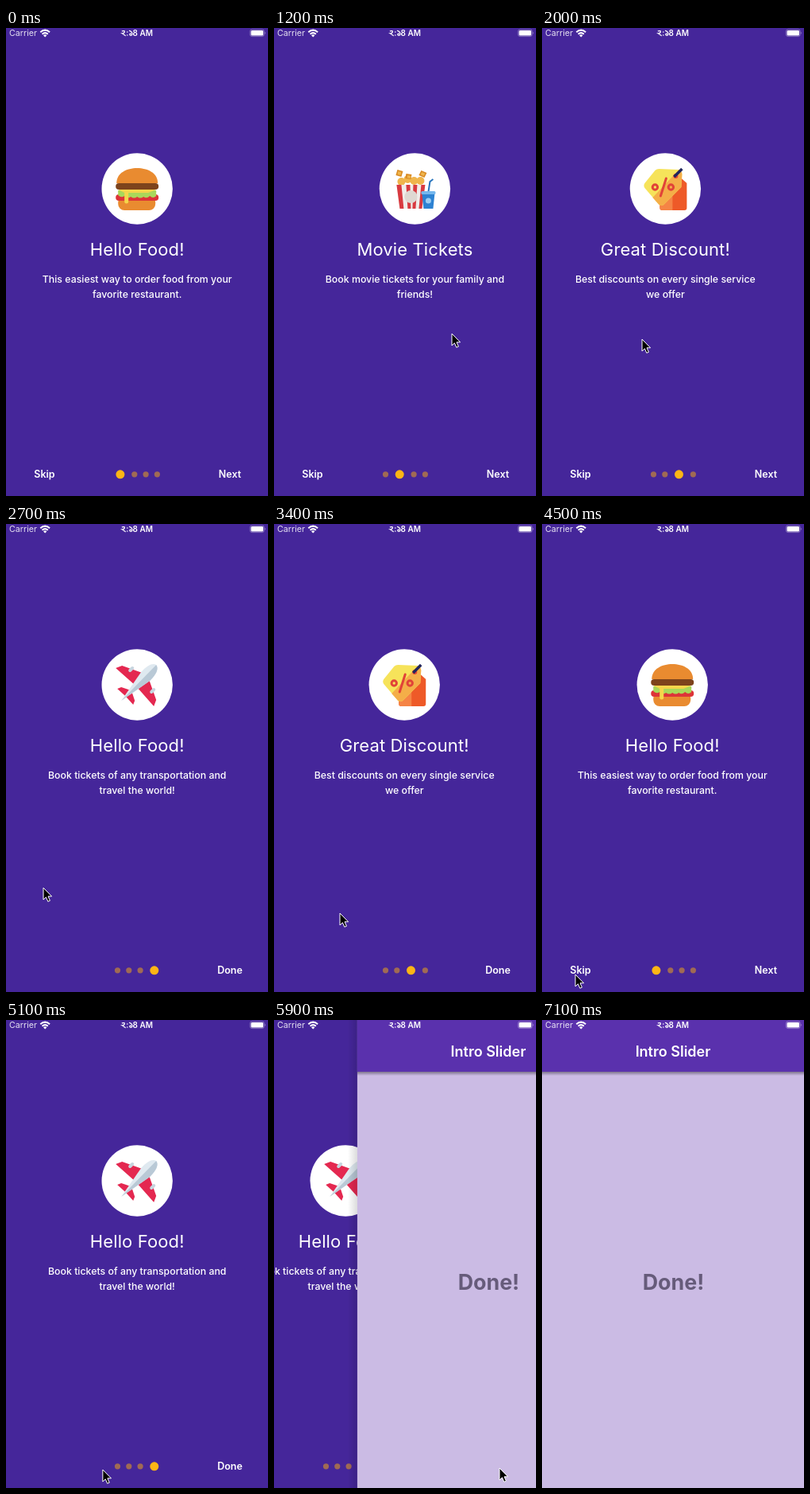
An HTML page that plays this animation: 330x588 px, repeating every 9500 ms.

```html
<!DOCTYPE html>
<html lang="en">
<head>
<meta charset="utf-8">
<title>Intro slider</title>
<style>
  html, body { margin: 0; width: 100%; height: 100%; overflow: hidden; background: #45269a; }
  svg { display: block; width: 330px; height: 588px; font-family: Inter, Roboto, sans-serif; fill: #fff; }
  text { white-space: pre; }
  .mid { text-anchor: middle; }
  .title { font-size: 22px; letter-spacing: .12px; }
  .body { font-size: 12.35px; font-weight: 500; }
  .button { font-size: 12.5px; font-weight: 600; }
</style>
</head>
<body>
<svg viewBox="0 0 330 588">
  <defs>
    <linearGradient id="edge"><stop stop-opacity="0"/><stop offset="1" stop-opacity=".14"/></linearGradient>
    <linearGradient id="under" x2="0" y2="1"><stop stop-opacity=".38"/><stop offset="1" stop-opacity="0"/></linearGradient>

    <g id="burger">
      <path fill="#e98b30" d="M-26-7C-26-20-13-26 0-26S26-20 26-7Z"/>
      <rect x="-24" y="9" width="47" height="18" rx="8" fill="#e98b30"/>
      <rect x="-27" y="7" width="54" height="8" rx="4" fill="#dd3438"/>
      <path fill="#a9d85a" d="M-24 2H24V9Q20 13 16 9Q12 13 8 10Q4 13 0 10Q-4 13-8 10Q-12 13-16 9Q-20 12-24 8Z"/>
      <path fill="#f5d64b" d="M-24 1H24L14 5H-11V16a2.5 2.5 0 0 1-5 0V5Z"/>
      <rect x="-27" y="-7" width="54" height="8" rx="4" fill="#7d431c"/>
    </g>

    <g id="popcorn">
      <g fill="#efb54c">
        <circle cx="-17" cy="-9" r="5"/><circle cx="-9" cy="-12" r="5"/><circle cx="-1" cy="-10" r="5"/><circle cx="7" cy="-10" r="5"/>
        <path fill="#d98b24" d="M-22-24l7 2-2 7-7-2ZM-11-19l7 1-1 6-7-1ZM8-23l7 3-3 6-7-3Z"/>
        <path d="M-21-22l4 1-1 4-4-1ZM-9-17l4 1-1 3-4-1ZM9-21l4 2-2 3-4-2Z"/>
      </g>
      <path fill="#f0ece9" d="M-23-5H13L9 25H-19Z"/>
      <path fill="#d83a40" d="M-23-5h6l3 30h-5ZM-11-5h5l1 30h-4ZM-2-5h5l-2 30h-4ZM8-5h5L9 25H5Z"/>
      <circle cx="-5" cy="10" r="8" fill="#ded8d2"/>
      <path fill="none" stroke="#2674bd" stroke-width="2" d="M17 4L19-9L23-12"/>
      <path fill="#2d82d2" d="M9 6H25L23 25H11Z"/>
      <rect x="8" y="3" width="18" height="4" rx="1.5" fill="#75b7ed"/>
      <circle cx="17" cy="15" r="3.5" fill="#9bcdf3"/>
    </g>

    <g id="tags">
      <path fill="#ee5a28" d="M-7 2L9-16H17L27-7V24Q27 27 24 27H-4Q-7 27-7 24Z"/>
      <path fill="#f58445" d="M-7 2H9V27H-4Q-7 27-7 24Z"/>
      <path fill="#f6e35a" d="M-26-7Q-28-4-26-1L-8 20Q-5 22-2 20L20-2L21-18Q21-22 17-24L-8-25Q-11-25-13-23Z"/>
      <path fill="#f4ae48" d="M17-24Q21-22 21-18L20-2L-2 20Q-5 22-8 20L-16 11Z"/>
      <g fill="none" stroke="#e14338" stroke-width="3">
        <circle cx="-13" cy="-2" r="3.2"/><circle cx="7" cy="-2" r="3.2"/>
        <path stroke-linecap="round" d="M-6 9L1-13"/>
      </g>
      <circle cx="13" cy="-16" r="3" fill="#e14338"/>
      <path stroke="#20265e" stroke-width="3.5" d="M11-15L21-25"/>
    </g>

    <g id="plane">
      <path id="wing" fill="#e42850" d="M-27-21L-19-24L12-13L-1 2ZM-25 5L-20 3L-8 7L-15 14Z"/>
      <use href="#wing" transform="matrix(0 -1 -1 0 0 0)"/>
      <path stroke="#c7d5df" stroke-width="4" stroke-linecap="round" d="M-9-18L-6-21M18 9L21 6"/>
      <path fill="#dfe9f0" d="M-20 20L5-16Q17-29 24-25Q29-18 16-5Z"/>
      <path fill="#b9c9d6" d="M-20 20L24-25Q29-18 16-5Z"/>
    </g>
  </defs>

  <g id="intro">
    <rect width="330" height="588" fill="#45269a"/>
    <g id="pages"></g>
    <text id="skip" class="button mid" x="48.5" y="565">Skip</text>
    <text id="next" class="button mid" x="282" y="565"></text>
    <g id="dots"></g>
  </g>

  <g id="done">
    <rect x="-12" width="12" height="588" fill="url(#edge)"/>
    <rect width="330" height="588" fill="#cbbbe4"/>
    <rect y="65" width="330" height="5" fill="url(#under)"/>
    <rect width="330" height="65" fill="#5a31ad"/>
    <text class="mid" x="165" y="46" font-size="18" font-weight="600">Intro Slider</text>
    <text class="mid" x="165.5" y="338.5" font-size="26.8" font-weight="700" fill="#665b7a">Done!</text>
  </g>

  <g id="status">
    <text x="4" y="10" font-size="10.7" opacity=".85">Carrier</text>
    <path fill="none" stroke="#fff" stroke-width="2" d="M43.3 5.3Q49.2 0 55.1 5.3M45.6 7.7Q49.2 4.6 52.8 7.7"/>
    <path d="M47 9.2Q49.2 7.4 51.4 9.2L49.2 11.4Z"/>
    <path fill="none" stroke="#fff" stroke-width="1.2" stroke-linecap="round"
      d="M146.3 3.9Q149.8 2.8 149.4 5Q148.6 7 146.2 6.8L150.3 9.6M155.5 3.4Q159.5 5 159 8Q157.5 10.6 155.8 8.6Q155.6 6.6 157.4 7.4"/>
    <circle cx="152.8" cy="5" r=".8"/><circle cx="152.8" cy="9" r=".8"/>
    <text x="185" y="10" font-size="10" font-weight="600" text-anchor="end">8 AM</text>
    <rect x="307.3" y="1.8" width="18" height="8.8" rx="2.8" fill="none" stroke="#fff" stroke-opacity=".4" stroke-width=".8"/>
    <rect x="308.5" y="3" width="15.6" height="6.4" rx="1.5"/>
    <path fill-opacity=".5" d="M326.3 4.7q1.6 1.5 0 3Z"/>
  </g>

  <path id="cursor" fill="#000" stroke="#fff" d="M0 0V15L3.4 11.8L5.8 17.3L8.4 16.2L6 10.8H10.6Z"/>
</svg>
<script>
const LOOP = 9500, STEP = 100, WIDTH = 330, LAST = 3;
const $ = id => document.getElementById(id);

const slides = [
  ['burger', 'Hello Food!', 'This easiest way to order food from your', 'favorite restaurant.'],
  ['popcorn', 'Movie Tickets', 'Book movie tickets for your family and', 'friends!'],
  ['tags', 'Great Discount!', 'Best discounts on every single service', 'we offer'],
  ['plane', 'Hello Food!', 'Book tickets of any transportation and', 'travel the world!'],
];
$('pages').innerHTML = slides.map(([icon, title, line1, line2]) => `<g class="mid">
  <circle cx="165.2" cy="202" r="44.7"/>
  <use href="#${icon}" x="165.2" y="202"/>
  <text class="title" x="165.2" y="286">${title}</text>
  <text class="body" x="165.2" y="320">${line1}</text>
  <text class="body" x="165.2" y="339">${line2}</text></g>`).join('');
$('dots').innerHTML = slides.map(() => '<circle cy="560.8"/>').join('');
const pages = [...$('pages').children], dots = [...$('dots').children];

// Page changes: start, duration, target page
const swipes = [
  [800, 600, 1], [1430, 500, 2], [1994, 600, 3],
  [2886, 600, 2], [3490, 480, 1], [3986, 600, 0], [4700, 350, 3],
];
const SKIP_TAP = 4700, PUSH_START = 5773, PUSH_TIME = 400;

// Pointer path: time, x, y
const pointer = [
  [600, 255, 386], [800, 240, 385], [1000, 150, 386], [1200, 224, 384], [1430, 235, 386],
  [1650, 110, 390], [1900, 150, 391], [2000, 126, 391], [2200, 45, 400], [2600, 40, 450],
  [2886, 65, 475], [3100, 190, 485], [3400, 83, 489], [3500, 75, 495], [3700, 190, 505],
  [3980, 65, 520], [4150, 175, 530], [4500, 42, 566], [4850, 42, 566], [5500, 284, 563],
  [6000, 284, 563], [6300, 300, 592],
];

const clamp = v => Math.min(1, Math.max(0, v));
const easeOut = u => 1 - (1 - clamp(u)) ** 3;
const smooth = u => u * u * (3 - 2 * u);
const move = (el, x, y = 0) => el.setAttribute('transform', `translate(${x} ${y})`);

function pagePosition(t) {
  let page = 0;
  for (const [start, time, target] of swipes) {
    if (t >= start) page += (target - page) * easeOut((t - start) / time);
  }
  return page;
}

// The selected page only updates once a swipe has come to rest
function settledPage(t) {
  if (t >= SKIP_TAP) return LAST;
  return swipes.reduce((page, [start, time, target]) => t >= start + time ? target : page, 0);
}

function drawPages(t) {
  const page = pagePosition(t), active = Math.round(page);
  const skipping = t >= SKIP_TAP;
  pages.forEach((el, i) => {
    // Skipping slides straight from the first page to the last
    const offset = skipping ? (i - page) / LAST : i - page;
    const shown = Math.abs(offset) < 1 && !(skipping && i % LAST);
    el.style.display = shown ? '' : 'none';
    move(el, offset * WIDTH);
  });
  dots.forEach((dot, i) => {
    const on = i === active;
    dot.setAttribute('cx', 140.5 + 14.3 * i + (on ? 3.4 : i > active ? 7 : 0));
    dot.setAttribute('r', on ? 5.5 : 3.6);
    dot.setAttribute('fill', on ? '#fdb515' : '#a06a54');
  });
  const atEnd = settledPage(t) === LAST;
  $('skip').style.display = atEnd ? 'none' : '';
  $('next').textContent = atEnd ? 'Done' : 'Next';
}

function drawPointer(t) {
  const k = pointer.findIndex(([time]) => time > t);
  $('cursor').style.display = k > 0 ? '' : 'none';
  if (k < 1) return;
  const [t0, x0, y0] = pointer[k - 1], [t1, x1, y1] = pointer[k];
  const u = smooth((t - t0) / (t1 - t0));
  move($('cursor'), x0 + (x1 - x0) * u, y0 + (y1 - y0) * u);
}

function draw(t) {
  drawPages(t);
  const push = easeOut((t - PUSH_START) / PUSH_TIME);
  move($('intro'), -push * WIDTH / 3);
  move($('done'), (1 - push) * WIDTH);
  $('done').style.display = push ? '' : 'none';
  drawPointer(t);
}

const begin = performance.now();
function tick() {
  const t = (performance.now() - begin) % LOOP;
  draw(Math.floor(t / STEP) * STEP);
  requestAnimationFrame(tick);
}
tick();
</script>
</body>
</html>
```
